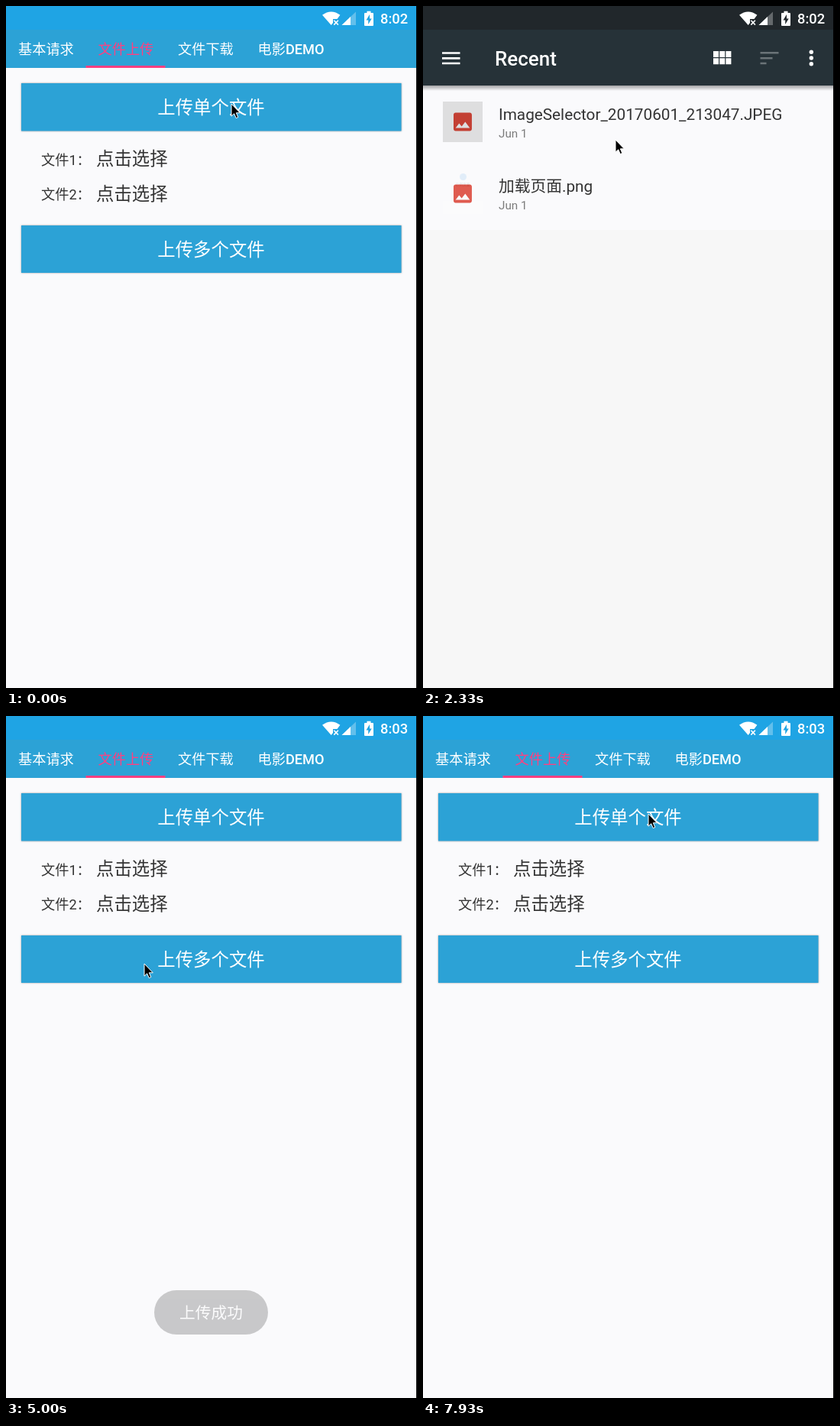
Recreate the animation shown at these times as an HTML page. Size 538 px wide and 892 px high, loop 8000 ms.

```html
<!DOCTYPE html>
<html lang="zh-CN">
<head>
<meta charset="utf-8">
<style>
html, body { margin: 0; width: 100%; height: 100%; overflow: hidden; background: #fafafc }
svg { display: block; width: 538px; height: 892px; font-family: Roboto, "Noto Sans CJK SC", "Noto Sans CJK", sans-serif }
.w { fill: #fff }
.tab { font-size: 18.2px }
.btn rect { fill: #2ca2d6; filter: drop-shadow(0 .5px 1.2px #0006) }
.btn text, .toast text { fill: #fff; text-anchor: middle }
.btn text, .pick { font-size: 23.4px }
.pick, .label, .name { fill: #333 }
.label { font-size: 18.2px }
.name { font-size: 20.75px }
.date { font-size: 15.2px; fill: #7b7b7b }
.toast { font-size: 20.7px }
</style>
</head>
<body>
<svg viewBox="0 0 538 892">
  <defs>
    <linearGradient id="shade" x2="0" y2="1">
      <stop stop-color="#000" stop-opacity=".35"/><stop offset="1" stop-color="#000" stop-opacity="0"/>
    </linearGradient>
    <path id="image" d="M21 19V5c0-1.1-.9-2-2-2H5c-1.1 0-2 .9-2 2v14c0 1.1.9 2 2 2h14c1.1 0 2-.9 2-2zM8.5 13.5l2.5 3L14.5 12l4.5 6H5z" fill="#db4437"/>
  </defs>

  <!-- upload page -->
  <rect width="538" height="892" fill="#fafafc"/>
  <rect width="538" height="81" fill="#2ca2d6"/>
  <rect width="538" height="31" fill="#1fa4e4"/>
  <g class="tab w">
    <text x="16" y="63">基本请求</text>
    <text x="120.5" y="63" fill="#ff4081">文件上传</text>
    <text x="225" y="63">文件下载</text>
    <text x="329.5" y="63">电影<tspan font-weight="500">DEMO</tspan></text>
  </g>
  <rect x="104.5" y="78" width="104" height="3" fill="#ff4081"/>
  <g class="btn">
    <rect x="20" y="101" width="497.5" height="62.5"/><text x="268.5" y="141">上传单个文件</text>
    <rect x="20" y="287" width="497.5" height="62"/><text x="268.5" y="327">上传多个文件</text>
  </g>
  <text class="label" x="46" y="208">文件1：</text><text class="pick" x="118" y="208">点击选择</text>
  <text class="label" x="46" y="253">文件2：</text><text class="pick" x="118" y="253.5">点击选择</text>
  <g class="toast" id="toast">
    <rect x="194" y="751" width="149" height="58" rx="29" fill="#646464"/>
    <text x="268.5" y="788">上传成功</text>
  </g>

  <!-- file picker -->
  <g id="picker">
    <rect width="538" height="892" fill="#f7f7f7"/>
    <rect y="104" width="538" height="189" fill="#fafafc"/>
    <rect y="104" width="538" height="7" fill="url(#shade)"/>
    <rect width="538" height="104" fill="#263238"/>
    <rect width="538" height="31" fill="#21272b"/>
    <path d="M25 61.5h23.5M25 68.3h23.5M25 75h23.5" stroke="#fff" stroke-width="2.7"/>
    <text class="w" x="94" y="78" font-size="26" font-weight="500">Recent</text>
    <path class="w" d="M380 59h7v8h-7zm8.2 0h7v8h-7zm8.2 0h7v8h-7zM380 68.3h7v8h-7zm8.2 0h7v8h-7zm8.2 0h7v8h-7z"/>
    <path d="M441.5 61.3h24M441.5 68.2h16M441.5 75h8" stroke="#6b7478" stroke-width="2.6"/>
    <g class="w"><circle cx="508.3" cy="60.3" r="2.7"/><circle cx="508.3" cy="68" r="2.7"/><circle cx="508.3" cy="75.7" r="2.7"/></g>
    <g id="icons">
      <use href="#image" transform="translate(36 135.5) scale(1.33)"/>
      <use href="#image" transform="translate(36 229.5) scale(1.33)"/>
    </g>
    <g id="thumbs">
      <rect x="26" y="125" width="52" height="53" fill="#10110a"/>
      <rect x="26" y="219" width="52" height="53" fill="#fefefe"/>
      <circle cx="52.5" cy="223.5" r="4.5" fill="#2a8fe8"/>
      <text x="52" y="235" font-size="4.8" text-anchor="middle" fill="#333">示例页面</text>
    </g>
    <text class="name" x="99" y="149">ImageSelector_20170601_213047.JPEG</text><text class="date" x="99" y="171.5">Jun 1</text>
    <text class="name" x="99" y="243">加载页面.png</text><text class="date" x="99" y="265.5">Jun 1</text>
  </g>

  <!-- status bar -->
  <g class="w">
    <path d="M414 11.8Q425.7 3 437.4 11.8L433.5 17H428V22L425.7 25Z"/>
    <path d="M429.3 18.8l5.6 5.8m0-5.8l-5.6 5.8" stroke="#fff" stroke-width="1.6"/>
    <path d="M439.5 25H458V7.5Z" opacity=".3"/>
    <path d="M439.5 25H451V14.1Z"/>
    <path fill-rule="evenodd" d="M472.5 9V6.8h5V9H480q1 0 1 1v15q0 1-1 1H470q-1 0-1-1V10q0-1 1-1zM476 11l-4.5 7.5h2.7V24l4.5-7.5H476z"/>
    <text id="clock" x="490" y="22.7" font-size="18.3" font-weight="500"></text>
  </g>
  <rect x="537" width="1" height="892"/>
  <path id="cursor" d="M0 0V16.2L3.7 12.8L6.2 18.6L8.8 17.5L6.3 11.8H11.3Z" stroke="#fff" stroke-width="1"/>
</svg>
<script>
const $ = id => document.getElementById(id);
const [toast, picker, icons, thumbs, clock, cursor] =
  ['toast', 'picker', 'icons', 'thumbs', 'clock', 'cursor'].map($);

// pointer stops: time, x, y
const stops = [
  [0, 295, 128], [1130, 295, 128], [1867, 228, 249], [2333, 252, 175], [2800, 225, 185],
  [3667, 133, 228], [3900, 133, 228], [4530, 165, 288], [5000, 181, 324], [5400, 195, 330],
  [6133, 262, 343], [7200, 215, 262], [7933, 188, 222]
];

const ramp = (t, from, to) => Math.min(1, Math.max(0, (t - from) / (to - from)));
const pulse = (t, a, b, c, d) => ramp(t, a, b) - ramp(t, c, d);

function pointer(t) {
  const i = Math.max(1, stops.findIndex(s => s[0] >= t));
  const [t0, x0, y0] = stops[i - 1], [t1, x1, y1] = stops[i];
  const k = ramp(t, t0, t1), e = k * k * (3 - 2 * k);
  return [x0 + (x1 - x0) * e, y0 + (y1 - y0) * e];
}

function draw(now) {
  const t = Math.floor((now % 8000 + 7) * .015) % 120 / .015;
  const open = pulse(t, 1990, 2200, 4590, 4760);
  picker.setAttribute('opacity', open);
  picker.setAttribute('transform', `translate(0 ${40 * (1 - open) ** 2})`);
  const loaded = ramp(t, 2295, 2630);
  thumbs.setAttribute('opacity', loaded);
  icons.setAttribute('opacity', 1 - loaded * loaded);
  toast.setAttribute('opacity', pulse(t, 4870, 5270, 6730, 7130));
  clock.textContent = t < 3200 ? '8:02' : '8:03';
  cursor.setAttribute('transform', `translate(${pointer(t)})`);
  requestAnimationFrame(draw);
}
draw(0);
</script>
</body>
</html>
```
